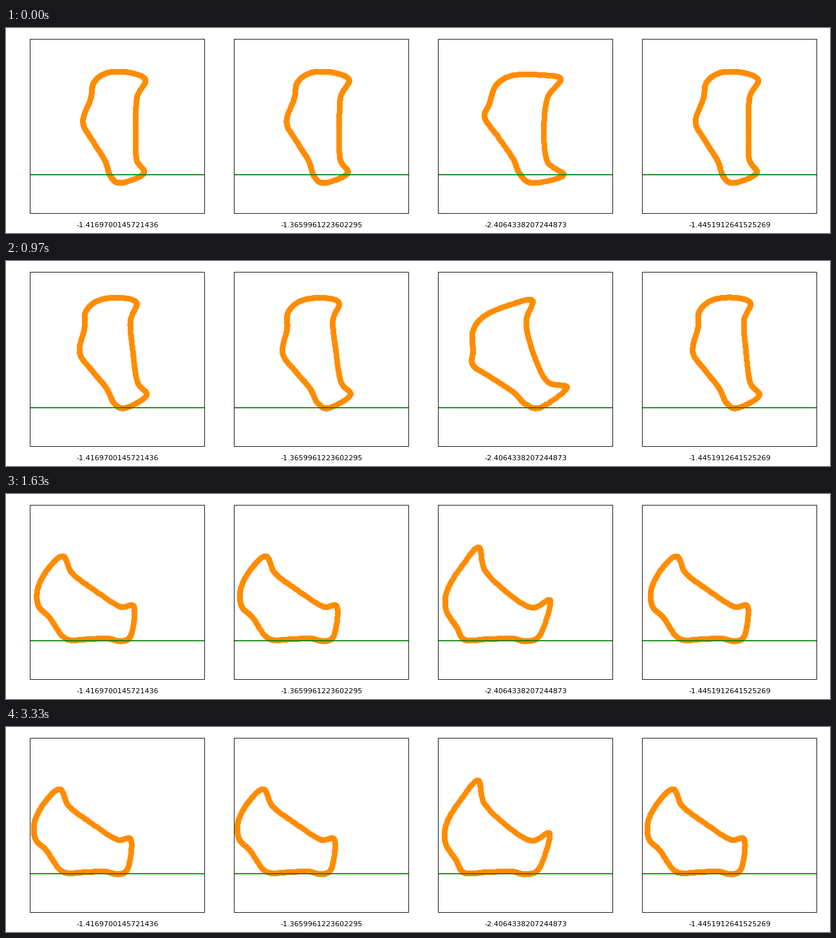
These frames come from a looping animation (1280 by 320 pixels, 3.36 s). A matplotlib script:

```python
import numpy as np
import matplotlib.pyplot as plt
from matplotlib.animation import FuncAnimation
from matplotlib.patches import Rectangle

W, H, DPI = 1280, 320, 80
LOOP_MS, TICK_MS, RATE = 3360, 10, 30
GROUND = 229
LEFT, TOP, BOX_W, BOX_H, PITCH = 37.2, 17, 270.9, 272, 316.95
HEEL = 10          # outline point the body turns about
TIP_OVER = 17      # step at which the fall begins
POWER = 2.2        # tilt grows as this power of time
SAMPLES = 32       # dots per outline segment

# Key points of the upright outlines: tip, back, foot, heel, inner side.
SLIM = np.array([
    (216, 81), (190, 69.5), (157, 70), (136, 85), (131, 110), (119, 147),
    (135, 178), (153, 207), (162, 232), (178, 242), (213.5, 227),
    (202, 204), (201, 152), (203, 108)])
WIDE = np.array([
    (227, 79), (198, 72.5), (153, 73), (127, 88), (116, 118), (109, 139),
    (129, 168), (153, 203), (163, 226), (183, 241), (231, 229),
    (206, 207), (201, 155), (207, 107)])


def ease(u):
    u = np.clip(u, 0, 1)
    return u * u * (3 - 2 * u)


def squash(pts, amount):
    """Sag of the soft body under its own weight, heel at the origin."""
    x, y = pts.T
    sagged = np.column_stack([1.07 * x, 0.925 * y - x * (0.195 + 0.0006 * y)])
    return pts + amount * (sagged - pts)


def turn(pts, angle):
    """Rotate counterclockwise on a y-down stage."""
    c, s = np.cos(angle), np.sin(angle)
    return pts @ np.array([[c, -s], [s, c]])


def smooth(pts):
    """Closed Catmull-Rom curve through the points."""
    u = np.linspace(0, 1, SAMPLES, endpoint=False)[None, :, None]
    a, b, c, d = (np.roll(pts, k, axis=0)[:, None] for k in (1, 0, -1, -2))
    curve = b + 0.5 * u * (c - a + u * (2 * a - 5 * b + 4 * c - d
                                        + u * (3 * (b - c) + d - a)))
    return curve.reshape(-1, 2)


class Body:
    def __init__(self, shape, heel_x, growth, rest, slide):
        self.shape = shape - shape[HEEL]
        self.heel_x, self.growth = heel_x, growth
        self.rest, self.slide = rest, slide
        self.lean = 0.078 / growth
        self.landing = TIP_OVER + ((rest + self.lean) / growth) ** (1 / POWER)

    def pose(self, n):
        # lean back a little, topple with growing speed, stop on the ground
        start = ease(n / TIP_OVER)
        fall = self.growth * max(n - TIP_OVER, 0) ** POWER
        tilt = min(fall - self.lean * start, self.rest)
        angle = np.radians(tilt)
        pts = smooth(turn(squash(self.shape, ease(tilt / self.rest)), angle))

        # roll on the foot, then slide to a halt after landing
        roll = 2 * start + 22 * np.sin(angle) - 67 * (1 - np.cos(angle))
        skid = self.slide * (1 - np.exp(-max(n - self.landing, 0) / 5))
        sink = 12 * np.exp(-n / 5)
        x = pts[:, 0] + self.heel_x + roll - skid
        y = pts[:, 1] - pts[:, 1].max() + GROUND + 0.5 + sink
        return x, y


bodies = [Body(SLIM, 213.7, 0.0387, 55.5, 11.3),
          Body(SLIM, 213.0, 0.0418, 55.5, 11.3),
          Body(WIDE, 231.3, 0.0875, 51.5, 15),
          Body(SLIM, 214.5, 0.0358, 55.5, 10)]
labels = ["-1.4169700145721436", "-1.3659961223602295",
          "-2.4064338207244873", "-1.4451912641525269"]

fig = plt.figure(figsize=(W / DPI, H / DPI), dpi=DPI, facecolor="white")
ax = fig.add_axes([0, 0, 1, 1])
ax.set_xlim(0, W)
ax.set_ylim(H, 0)
ax.axis("off")

dots = []
for i, label in enumerate(labels):
    x = LEFT + i * PITCH
    dots += ax.plot([], [], "o", ms=6, mew=1.5, color="darkorange", zorder=1)
    ax.plot([x, x + BOX_W], [GROUND, GROUND], color="green", lw=1.5,
            solid_capstyle="butt", zorder=2)
    ax.add_patch(Rectangle((x, TOP), BOX_W, BOX_H, fill=False,
                           ec="black", lw=0.8, zorder=3))
    ax.text(x + BOX_W / 2 + 0.5, 311, label, fontsize=10,
            family="DejaVu Sans", ha="center", va="baseline")


def update(frame):
    step = int((frame * TICK_MS + TICK_MS / 2) * RATE / 1000)
    for i, (body, dot) in enumerate(zip(bodies, dots)):
        x, y = body.pose(step)
        dot.set_data(x + i * PITCH, y)
    return dots


anim = FuncAnimation(fig, update, frames=LOOP_MS // TICK_MS,
                     interval=TICK_MS, repeat=True, repeat_delay=0)
plt.show()
```
